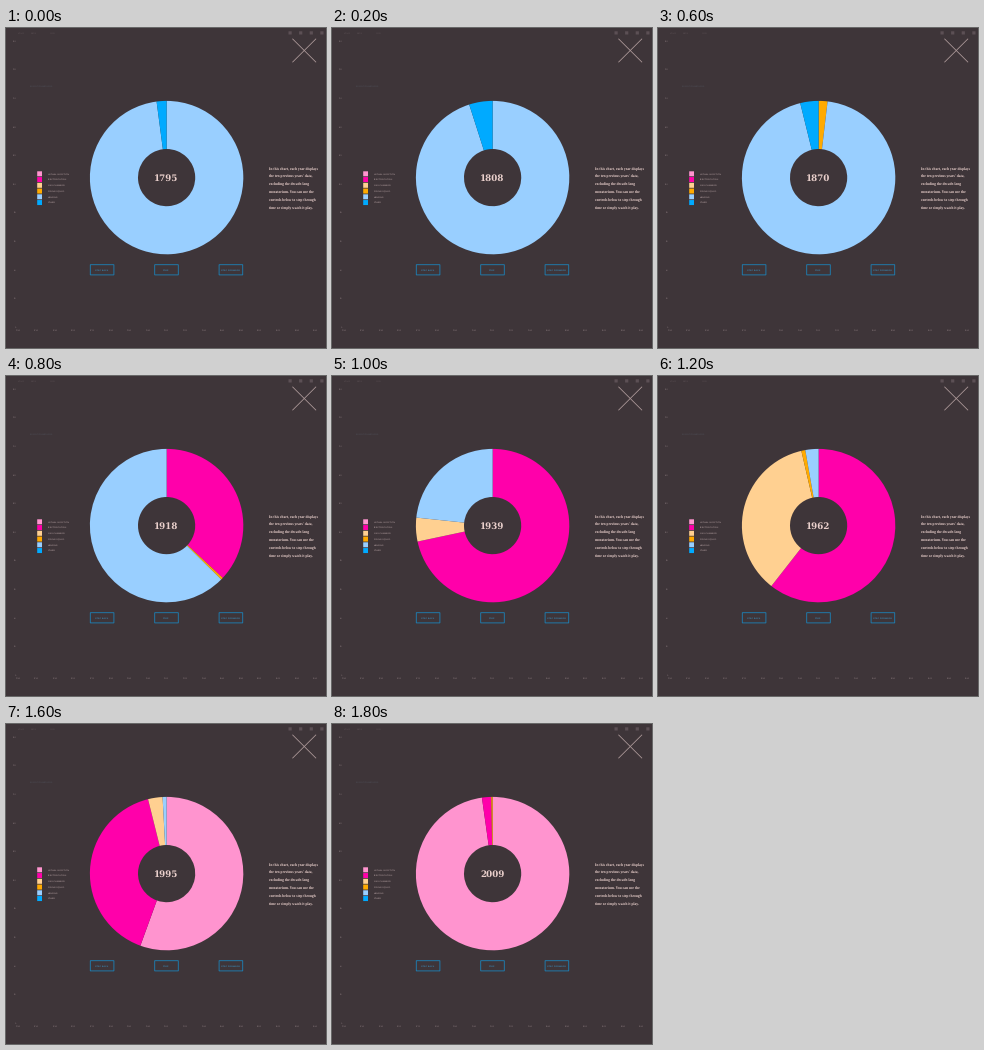
A matplotlib script for the animation above (2000 ms loop, 320 by 320 pixels).

```python
import matplotlib.pyplot as plt
import numpy as np
from matplotlib.animation import FuncAnimation
from matplotlib.patches import Rectangle, Wedge

SIZE, DPI, FRAMES = 320, 80, 10
BG, PALE, DIM, FAINT = "#3e3539", "#ead0cc", "#8d7d80", "#5c5055"
BLUE = "#1d7fb4"
CENTER, OUTER, INNER = (160.6, 149.6), 76.7, 28.6

# Frame -> year shown; the years between are interpolated
TIMELINE = {0: 1795, 2: 1821, 4: 1918, 5: 1939, 7: 1984, 8: 1995, 9: 2009}

# Name, colour and slice angle by year; hanging fills what the others leave
METHODS = [
    ("LETHAL INJECTION", "#ff94cf", {1977: 0, 1984: 32.7, 1995: 200, 2009: 352}),
    ("ELECTROCUTION", "#ff00aa", {1889: 0, 1918: 133, 1939: 258, 1962: 218,
                                  1984: 229, 1995: 146, 2009: 7}),
    ("GAS CHAMBER", "#ffd091", {1924: 0, 1939: 18, 1962: 129, 1984: 65.5, 1995: 11, 2009: 0}),
    ("FIRING SQUAD", "#ffaa00", {1808: 0, 1821: 12, 1918: 1.6, 1939: 0,
                                 1962: 3, 1984: 32.8, 1995: 0, 2009: 1}),
    ("HANGING", "#99cfff", None),
    ("OTHER", "#00aaff", {1795: 7.5, 1821: 28, 1918: 0}),
]

NOTE = [
    "In this chart, each year displays",
    "the ten previous years' data,",
    "excluding the decade-long",
    "moratorium. You can use the",
    "controls below to step through",
    "time or simply watch it play.",
]

plt.rcParams["text.hinting"] = "none"
fig = plt.figure(figsize=(SIZE / DPI, SIZE / DPI), dpi=DPI, facecolor=BG)
ax = fig.add_axes([0, 0, 1, 1])
ax.set_xlim(0, SIZE)
ax.set_ylim(SIZE, 0)
ax.axis("off")


def label(x, y, text, px, color, ha="left", family="Liberation Sans", weight="normal"):
    return ax.text(x, y, text, fontsize=px * 72 / DPI, color=color, ha=ha,
                   va="center_baseline", family=family, weight=weight)


def box(x, y, w, h, **style):
    ax.add_patch(Rectangle((x, y), w, h, snap=False, **style))


def draw_axes():
    for i in range(11):
        label(10.3, 13 + 28.6 * i, str(200 - 20 * i), 2.3, DIM, "right")
    for i in range(17):
        label(12 + 18.6 * i, 302.3, str(1690 + 20 * i), 2.3, DIM, "center")


def draw_header():
    for x, text in ((12, "HOME"), (25, "DATA"), (44, "INFO")):
        label(x, 5, text, 2.4, FAINT)
    label(24, 58, "EXECUTION METHODS", 2, "#50525c")
    for i in range(4):
        box(282.5 + 10.6 * i, 3.3, 3.2, 3.2, fc=FAINT, lw=0)
    for ends in ((11, 34), (34, 11)):
        ax.plot([286.7, 309.8], ends, color="#b09c9c", lw=0.7)


def draw_legend():
    for i, (name, color, _) in enumerate(METHODS):
        y = 145.8 + 5.75 * i
        box(31.2, y - 2.5, 4.8, 5, fc=color, lw=0)
        label(41.8, y, name, 2.2, "#c2adae")


def draw_buttons():
    for i, text in enumerate(("STEP BACK", "STOP", "STEP FORWARD")):
        x = 96.1 + 64.4 * i
        box(x - 11.8, 236.7, 23.6, 10.2, fc="none", ec=BLUE, lw=0.8)
        label(x, 241.8, text, 2.4, "#3aa3dc", "center")


def curve(points, at):
    return np.interp(at, list(points), list(points.values()))


draw_axes()
draw_header()
draw_legend()
draw_buttons()
for row, line in enumerate(NOTE):
    label(263.4, 140.4 + 7.8 * row, line, 3.65, PALE,
          family="Liberation Serif", weight="bold")

slices = [ax.add_patch(Wedge(CENTER, OUTER, 0, 1, width=OUTER - INNER, fc=color, lw=0))
          for _, color, _ in METHODS]
year_text = label(160.4, 149.1, "", 8.7, PALE, "center", "DejaVu Serif", "bold")


def update(i):
    year = round(float(curve(TIMELINE, i)))
    year_text.set_text(str(year))
    angles = [curve(points, year) if points else 0 for _, _, points in METHODS]
    rest = max(0, 360 - sum(angles))
    start = -90
    for wedge, angle, (_, _, points) in zip(slices, angles, METHODS):
        end = start + (angle if points else rest)
        wedge.set_visible(end - start > 0.1)
        if wedge.get_visible():
            wedge.set_theta1(start)
            wedge.set_theta2(end)
        start = end
    return [*slices, year_text]


anim = FuncAnimation(fig, update, frames=FRAMES, interval=200, repeat=True, repeat_delay=0)
plt.show()
```
